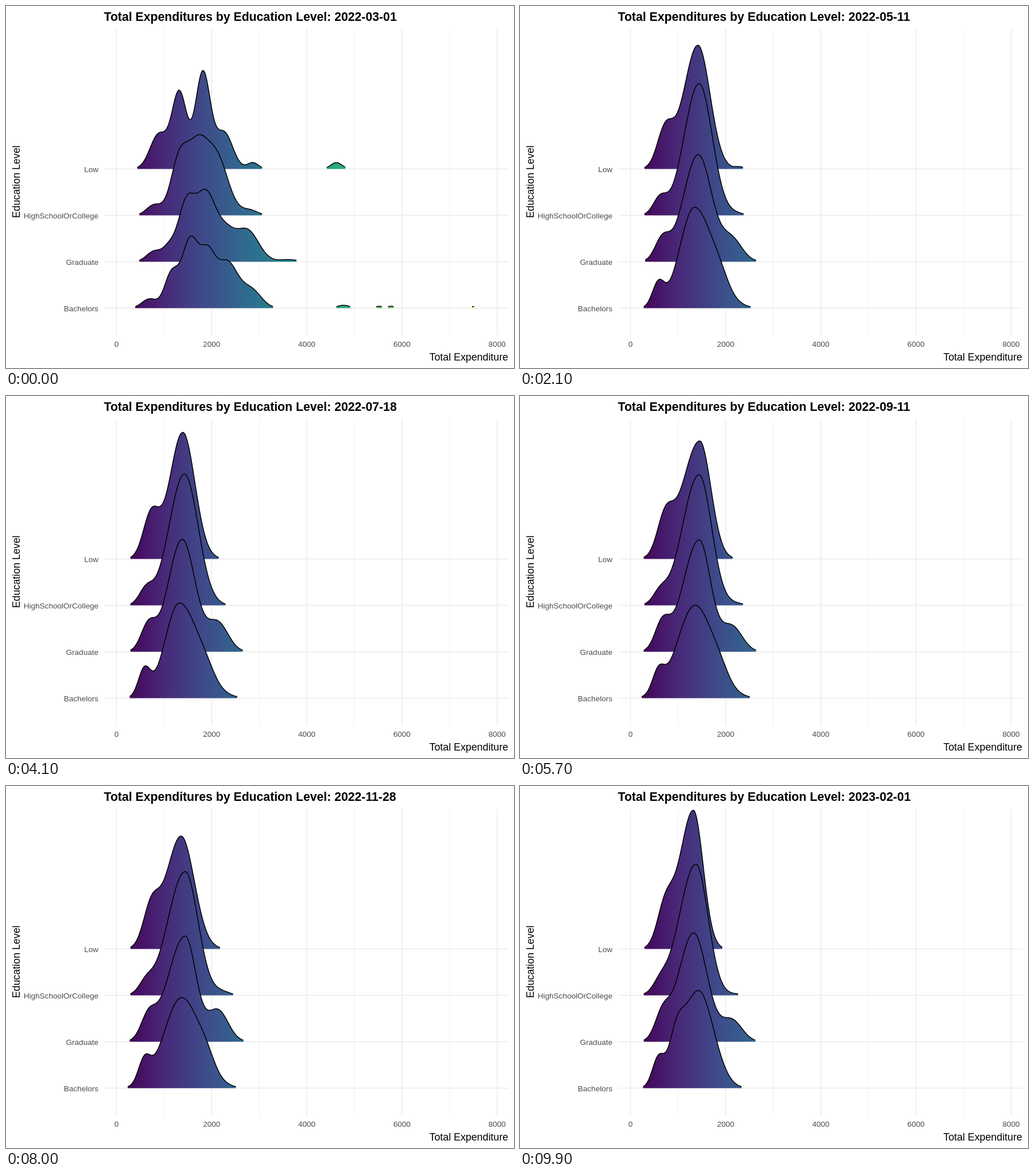
An HTML page that plays this animation: 885x632 px, repeating every 10 s.

```html
<!DOCTYPE html>
<html lang="en">
<head>
<meta charset="utf-8">
<title>Total Expenditures by Education Level</title>
<style>
  html, body { margin: 0; width: 100%; height: 100%; overflow: hidden; background: #fff; }
  svg { display: block; width: 885px; height: 632px; font-family: "Liberation Sans", Arial, sans-serif; }
  .title { font-size: 21.22px; font-weight: bold; }
  .axis { font-size: 17.8px; text-anchor: end; }
  .tick { font-size: 13.55px; fill: #4d4d4d; }
  .line { fill: none; stroke: #000; stroke-width: 1.5; stroke-linejoin: round; }
</style>
</head>
<body>
<svg id="chart" viewBox="0 0 885 632">
  <defs>
    <linearGradient id="viridis" gradientUnits="userSpaceOnUse" x1="206" x2="822" y1="0" y2="0"></linearGradient>
  </defs>
  <rect width="885" height="632" fill="#fff"/>
</svg>
<script>
const svg = document.getElementById('chart');

const FRAMES = 100, FRAME_MS = 100, DAYS = 337;
const LATE_MARCH = 6, APRIL = 31 / DAYS * (FRAMES - 1);
const keyTimes = [0, APRIL, 21, 41, 57, 80, 99];

// A density is a sum of bells: [centre, height, left spread, right spread = left], in px.
// march and lateMarch list their bells. From May on, a ridge is a main peak
// [centre, height, left, right] between a fixed shoulder and a fixed tail,
// whose heights come last: peak(..., shoulder, tail).
const groups = [
  {
    label: 'Low',
    march: [[266, 60, 15], [302, 133, 13], [343, 168, 13], [380, 63, 15], [430, 11, 9.5], [575.5, 11, 9.7]],
    lateMarch: [[253, 62, 14], [314, 197, 24], [380, 17, 12]],
    shoulder: [253, 14], tail: [382, 8],
    later: [
      peak(310, 216, 25, 21, 66, 3.5),
      peak(308, 221, 23, 21, 76, 0),
      peak(313, 206, 30, 19.5, 64, 0),
      peak(305, 197, 26, 23, 66, 0),
      peak(302, 242, 24, 17, 68, 0)
    ]
  },
  {
    label: 'HighSchoolOrCollege',
    march: [[258, 18, 13], [302, 95, 15], [333, 105, 17], [367, 100, 20], [424, 9, 14]],
    lateMarch: [[244, 22, 12], [316, 196, 26.5, 27], [376, 23, 17]],
    shoulder: [244, 12], tail: [376, 14],
    later: [
      peak(312, 230, 26, 22.8, 29, 3),
      peak(311, 229, 27, 23.7, 26, 0),
      peak(312, 228, 29, 21.7, 20, 3),
      peak(312, 216, 30, 22.5, 19, 6),
      peak(306.5, 229, 29, 21, 17, 2)
    ]
  },
  {
    label: 'Graduate',
    march: [[258, 18, 13], [284, 22, 11], [314, 98, 14.5], [348, 115, 17], [382, 45, 16], [420, 55, 20], [492, 3.6, 17]],
    lateMarch: [[248, 26, 13], [324, 155, 32, 31], [403, 28, 27]],
    shoulder: [248, 13], tail: [369, 18],
    later: [
      peak(310.5, 187, 26, 23.5, 38, 38),
      peak(307, 196, 24.5, 22.5, 45, 50),
      peak(312, 195, 28, 20, 47, 44),
      peak(312, 184, 30, 19, 39, 55),
      peak(302.5, 190, 26.5, 23.5, 42, 37)
    ]
  },
  {
    label: 'Bachelors',
    march: [[250, 16, 13], [288, 58, 12], [321, 118, 14.5], [351, 80, 13], [385, 80, 19], [428, 30, 17],
            [588, 5, 10.3], [649.5, 3.2, 7], [671, 3.2, 7], [814, 2.6, 7]],
    lateMarch: [[243.5, 37, 11.5], [309, 156, 23.5, 27], [359, 61, 17, 26], [422, 11, 16]],
    shoulder: [241, 10.5], tail: [350, 14],
    later: [
      peak(304, 176, 25.5, 33.5, 41, 14),
      peak(302, 166, 25, 35, 47, 11),
      peak(305, 162, 31, 33, 37, 12),
      peak(306, 158, 31, 33, 40, 17),
      peak(311, 170, 29, 25.8, 47, 3, [272, 52, 12])
    ]
  }
];

function peak(centre, height, left, right, shoulder, tail, ...extra) {
  return { main: [centre, height, left, right], shoulder, tail, extra };
}

const MIN_HEIGHT = 2.42;
const STEP = 1.2, GRID_START = 206;
const xs = Array.from({ length: 515 }, (_, i) => GRID_START + i * STEP);

function bell(x, [centre, height, left, right = left]) {
  const u = (x - centre) / (x < centre ? left : right);
  return height * Math.exp(-u * u / 2);
}

const density = bells => xs.map(x => bells.reduce((sum, b) => sum + bell(x, b), 0));

function buildKeys({ march, lateMarch, shoulder, tail, later }) {
  const first = density(march);
  // Late March lies on the way to April, so carry its change on to that month.
  const april = density(lateMarch).map((h, i) =>
    Math.max(0, first[i] + (h - first[i]) * APRIL / LATE_MARCH));
  const rest = later.map(k => density([
    k.main,
    [shoulder[0], k.shoulder, shoulder[1]],
    [tail[0], k.tail, tail[1]],
    ...k.extra
  ]));
  return [first, april, ...rest];
}

function el(name, attrs, text) {
  const node = document.createElementNS('http://www.w3.org/2000/svg', name);
  for (const key in attrs) node.setAttribute(key, attrs[key]);
  if (text) node.textContent = text;
  return node;
}
const add = (name, attrs, text) => svg.appendChild(el(name, attrs, text));

const stops = ['#440154', '#482878', '#3e4a89', '#31688e', '#26828e',
               '#1f9e89', '#35b779', '#6dcd59', '#b4de2c', '#fde725'];
const gradient = document.getElementById('viridis');
stops.forEach((color, i) => gradient.append(el('stop', { offset: i / 9, 'stop-color': color })));

const gridLine = (d, width) => add('path', { d, stroke: '#ebebeb', 'stroke-width': width });
for (let k = 0; k <= 8; k++) {
  const x = 192.4 + k * 82.9;
  gridLine(`M${x} 40V576`, k % 2 ? 0.75 : 1.45);
  if (k % 2 === 0) add('text', { x, y: 595, class: 'tick', 'text-anchor': 'middle' }, String(k * 1000));
}

const ridges = groups.map((group, i) => {
  const base = 284.4 + i * 81;
  gridLine(`M171 ${base}H875`, 1.45);
  add('text', { x: 161, y: base + 5.4, class: 'tick', 'text-anchor': 'end' }, group.label);
  return { base, keys: buildKeys(group) };
});
for (const ridge of ridges) {
  ridge.fill = add('path', { fill: 'url(#viridis)' });
  ridge.line = add('path', { class: 'line' });
}

const title = add('text', { x: 170.5, y: 26, class: 'title' });
add('text', { x: 875, y: 619, class: 'axis' }, 'Total Expenditure');
add('text', { class: 'axis', transform: 'translate(23.5 243.5) rotate(-90)' }, 'Education Level');

function drawRidge({ base, keys, fill, line }, k, mix) {
  let area = '', outline = '', run = [];
  const flush = () => {
    if (run.length > 1) {
      const top = run.map(p => p.join(' ')).join('L');
      outline += 'M' + top;
      area += `M${run[0][0]} ${base}L${top}V${base}Z`;
    }
    run = [];
  };
  xs.forEach((x, i) => {
    const h = keys[k][i] * (1 - mix) + keys[k + 1][i] * mix;
    if (h >= MIN_HEIGHT) run.push([x.toFixed(1), (base - h).toFixed(2)]);
    else flush();
  });
  flush();
  fill.setAttribute('d', area);
  line.setAttribute('d', outline);
}

let shown = -1;
function render(ms) {
  const frame = Math.floor(ms / FRAME_MS) % FRAMES;
  if (frame === shown) return;
  shown = frame;
  let k = 0;
  while (k < keyTimes.length - 2 && frame >= keyTimes[k + 1]) k++;
  const mix = (frame - keyTimes[k]) / (keyTimes[k + 1] - keyTimes[k]);
  ridges.forEach(ridge => drawRidge(ridge, k, mix));
  const day = Math.floor(DAYS * frame / (FRAMES - 1));
  const date = new Date(Date.UTC(2022, 2, 1 + day)).toISOString().slice(0, 10);
  title.textContent = `Total Expenditures by Education Level: ${date}`;
}

const start = performance.now();
function tick() {
  render(performance.now() - start);
  requestAnimationFrame(tick);
}
tick();
</script>
</body>
</html>
```
